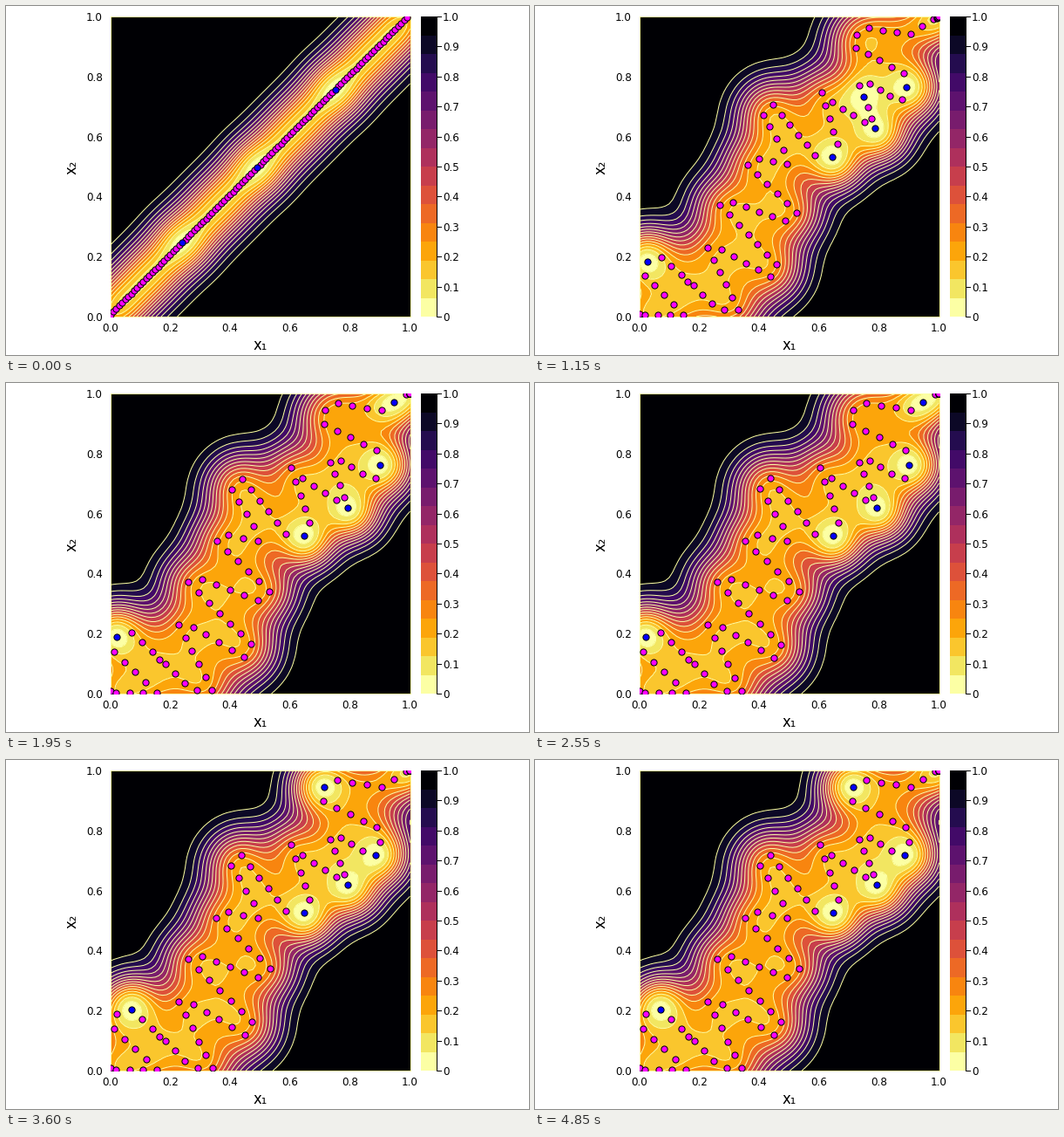
These frames come from a looping animation (600 px wide and 400 px high, 4900 ms). A matplotlib script:

```python
import numpy as np
import matplotlib.pyplot as plt
from matplotlib.animation import FuncAnimation
from matplotlib.patches import Rectangle

plt.rcParams["font.family"] = "DejaVu Sans"

W, H, DPI = 600, 400, 100
LEFT, TOP, SIDE = 119.5, 12, 344
BOTTOM = TOP + SIDE
FRAMES, INTERVAL = 98, 50
PX = 72 / DPI  # one pixel in points
BANDS = 16
COLORS = plt.get_cmap("inferno_r")(np.linspace(0, 1, BANDS))
LINE = "#fcffa4"

STATIONS = 100
STEP = 17     # pixels between neighbouring stations
SETTLE = 9    # time constant of the spreading, in frames

# Corners of the settled zigzag path, in pixels
CORNERS = [
    (120, 356), (120, 353), (126, 355), (173, 355), (124, 308), (127, 291),
    (144, 286), (168, 308), (176, 317), (183, 322), (205, 345), (220, 353),
    (237, 353), (198, 277), (215, 280), (274, 315), (282, 300), (209, 228),
    (225, 225), (289, 249), (303, 239), (241, 181), (255, 174), (289, 181),
    (284, 164), (258, 121), (270, 109), (321, 173), (342, 175), (348, 160),
    (327, 97), (340, 109), (392, 143), (388, 131), (372, 91), (384, 89),
    (409, 104), (424, 109), (429, 94), (425, 77), (364, 47), (365, 31),
    (380, 23), (431, 31), (459, 13), (463, 12)]

# Precise stations, from the given frame on
PRECISE = [
    (0, [24, 49, 75]),
    (6, [24, 49, 64, 75]),
    (19, [10, 61, 71, 74, 80]),
    (28, [10, 61, 71, 80, 91]),
    (72, [11, 61, 71, 79, 86]),
]

SCALE = 0.1
NOISE, PRECISE_NOISE = 1.0, 0.01
axis = np.linspace(0, 1, 81)


def zigzag():
    """Stations about one step apart, with one on every corner."""
    corners = np.array(CORNERS, float)
    lengths = np.hypot(*np.diff(corners, axis=0).T)
    counts = np.maximum(1, np.round(lengths / STEP))
    at = np.concatenate([[0], np.cumsum(counts)])
    i = np.arange(STATIONS)
    x, y = (np.interp(i, at, c) for c in corners.T)
    return np.array([(x - LEFT) / SIDE, (BOTTOM - y) / SIDE])


ramp = np.arange(STATIONS) / 100
straight = np.array([ramp, ramp + 0.007])
settled = zigzag()


def stations(t):
    return settled + (straight - settled) * np.exp(-t / SETTLE)


def precise_at(t):
    return [ids for start, ids in PRECISE if start <= t][-1]


def bell(a, b):
    return np.exp(-(a[:, None] - b[None, :]) ** 2 / (2 * SCALE ** 2))


def variance(x, y, precise):
    """Posterior variance of a Gaussian process on the grid."""
    noise = np.full(x.size, NOISE)
    noise[precise] = PRECISE_NOISE
    inv = np.linalg.inv(bell(x, x) * bell(y, y) + np.diag(noise))
    k = (bell(axis, y)[:, None, :] * bell(axis, x)[None, :, :]).reshape(-1, x.size)
    return (1 - ((k @ inv) * k).sum(axis=1)).reshape(axis.size, axis.size)


fig = plt.figure(figsize=(W / DPI, H / DPI), dpi=DPI, facecolor="white")

# Pixel canvas for labels and colour bar
page = fig.add_axes([0, 0, 1, 1])
page.set(xlim=(0, W), ylim=(H, 0))
page.axis("off")

ax = fig.add_axes([LEFT / W, 1 - BOTTOM / H, SIDE / W, SIDE / H])
ax.set(xlim=(0, 1), ylim=(0, 1), xticks=[], yticks=[])
ax.spines[:].set(color=LINE, linewidth=PX)


def label(x, y, text, size=12, **kw):
    page.text(x, y, text, fontsize=size * PX, va="center_baseline", **kw)


for v in np.linspace(0, 1, 6):
    label(LEFT + SIDE * v, 368, f"{v:.1f}", ha="center")
    label(111, BOTTOM - SIDE * v, f"{v:.1f}", ha="right")
label(291.5, 387, "x₁", 16.5, ha="center")
label(76, 184, "x₂", 16.5, ha="center", rotation=90)

BAR_X, BAR_W = 475.5, 18
band = SIDE / BANDS
for n, color in enumerate(COLORS):
    page.add_patch(Rectangle((BAR_X, BOTTOM - (n + 1) * band), BAR_W, band,
                             facecolor=color, linewidth=0, antialiased=False))
bar_right = BAR_X + BAR_W
page.plot([bar_right] * 2, [TOP, BOTTOM], color="black", lw=PX)
for n in range(11):
    y = BOTTOM - SIDE * n / 10
    page.plot([bar_right, bar_right + 5], [y, y], color="black", lw=PX)
    label(501, y, f"{n / 10:.1f}" if n else "0", ha="left")

dot = dict(marker="o", ls="", ms=7.2 * PX, mec="black", mew=PX, zorder=5)
rough_dots, = ax.plot([], [], mfc="#ff00ff", **dot)
precise_dots, = ax.plot([], [], mfc="#0000ff", **dot)

levels = np.linspace(0, 1, BANDS + 1)
fill_levels = np.append(levels[:-1], 1.001)
contours = []


def update(t):
    while contours:
        contours.pop().remove()
    x, y = stations(t)
    precise = precise_at(t)
    z = np.clip(variance(x, y, precise), 0, 1)
    contours.append(ax.contourf(axis, axis, z, levels=fill_levels,
                                colors=COLORS, zorder=1))
    contours.append(ax.contour(axis, axis, z, levels=levels[1:-1],
                               colors=LINE, linewidths=PX, zorder=2))
    rough = np.delete(np.arange(STATIONS), precise)
    rough_dots.set_data(x[rough], y[rough])
    precise_dots.set_data(x[precise], y[precise])
    return [*contours, rough_dots, precise_dots]


anim = FuncAnimation(fig, update, frames=FRAMES, interval=INTERVAL,
                     repeat=True, repeat_delay=0, blit=False)
plt.show()
```
